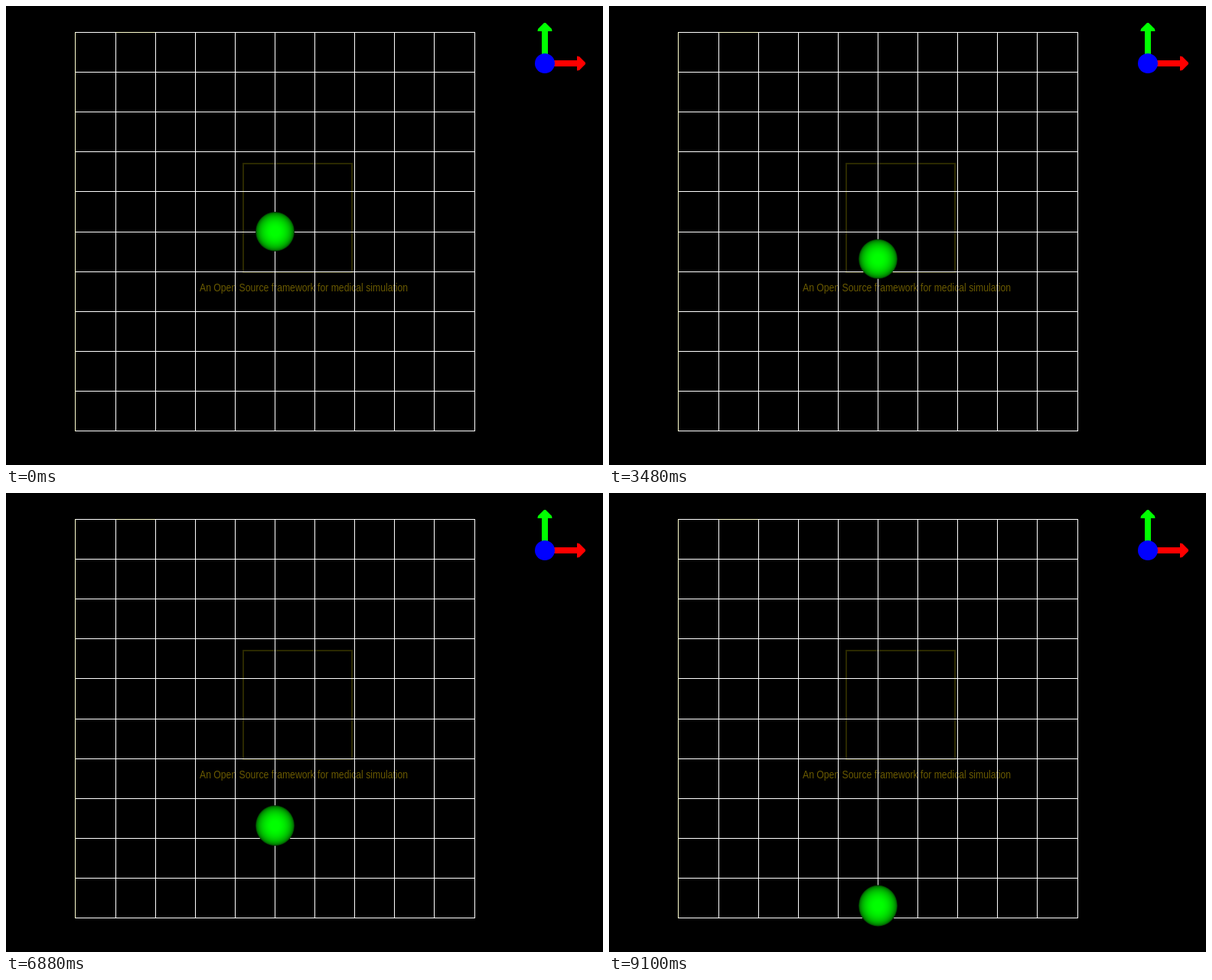
These frames come from a looping animation (780x600 px, 9.12 s). An HTML page with a canvas:

```html
<!DOCTYPE html>
<html lang="en">
<head>
<meta charset="utf-8">
<title>Falling ball</title>
<style>
  html, body { margin: 0; width: 100%; height: 100%; overflow: hidden; background: #000; }
  canvas { display: block; }
</style>
</head>
<body>
<canvas id="stage" width="780" height="600"></canvas>
<script>
const ctx = document.getElementById('stage').getContext('2d');
const LOOP = 9120;
const FRAME = 20;
const CELLS = 10;
const STEP = 52.12;

const gridX = i => Math.floor(90.9 + STEP * i);
const gridY = i => Math.floor(34.5 + STEP * i);

function shape(color, points) {
  ctx.fillStyle = color;
  ctx.beginPath();
  points.forEach(([x, y]) => ctx.lineTo(x, y));
  ctx.closePath();
  ctx.fill();
}

function drawBackdrop() {
  ctx.fillStyle = '#000';
  ctx.fillRect(0, 0, 780, 600);

  // plain square in place of the emblem
  ctx.strokeStyle = '#2b2900';
  ctx.lineWidth = 2;
  ctx.strokeRect(310, 206, 142, 142);

  // narrow sans face
  ctx.save();
  ctx.translate(253, 373);
  ctx.scale(0.82, 1);
  ctx.font = '14.9px "Liberation Sans", Arial, sans-serif';
  ctx.fillStyle = '#6a5a00';
  ctx.fillText('An Open Source framework for medical simulation', 0, 0);
  ctx.restore();
}

function drawGrid() {
  const left = gridX(0), top = gridY(0);
  const width = gridX(CELLS) - left + 1;
  const height = gridY(CELLS) - top + 1;
  ctx.fillStyle = '#fff';
  for (let i = 0; i <= CELLS; i++) {
    ctx.fillRect(gridX(i), top, 1, height);
    ctx.fillRect(left, gridY(i), width, 1);
  }
  ctx.fillStyle = '#ffffd0';
  ctx.fillRect(left, top, 1, height);
  ctx.fillRect(gridX(1), top, STEP, 1);
}

function drawAxes() {
  // one arrow pointing right, turned for the second axis
  const arrow = (color, angle) => {
    ctx.save();
    ctx.translate(704, 75);
    ctx.rotate(angle);
    shape(color, [[0, -4], [42, -4], [42, -9.5], [45, -9], [53, -1],
                  [53, 1], [45, 9], [42, 9.5], [42, 4], [0, 4]]);
    ctx.restore();
  };
  arrow('#f00', 0);
  arrow('#0f0', -Math.PI / 2);
  ctx.fillStyle = '#00f';
  ctx.beginPath();
  ctx.arc(704, 75, 13, 0, Math.PI * 2);
  ctx.fill();
}

// sphere lit from the viewer
const shade = ctx.createRadialGradient(0, 0, 0, 0, 0, 1);
for (let i = 0; i <= 16; i++) {
  const r = i / 16;
  const light = 0.16 + 0.86 * Math.sqrt(1 - r * r);
  shade.addColorStop(r, `rgb(0,${Math.round(255 * Math.min(1, light))},0)`);
}

function drawBall(seconds) {
  const fall = 2.955 * seconds * seconds;
  ctx.save();
  ctx.translate(351.5, 294.9 + fall);
  ctx.scale(25.5, 25.8 + fall * 0.005);
  ctx.fillStyle = shade;
  ctx.beginPath();
  ctx.arc(0, 0, 1, 0, Math.PI * 2);
  ctx.fill();
  ctx.restore();
}

function render(now) {
  const time = Math.floor((now % LOOP) / FRAME) * FRAME;
  drawBackdrop();
  drawGrid();
  drawBall(time / 1000);
  drawAxes();
}

const start = performance.now();
function tick() {
  render(performance.now() - start);
  requestAnimationFrame(tick);
}
tick();
</script>
</body>
</html>
```
